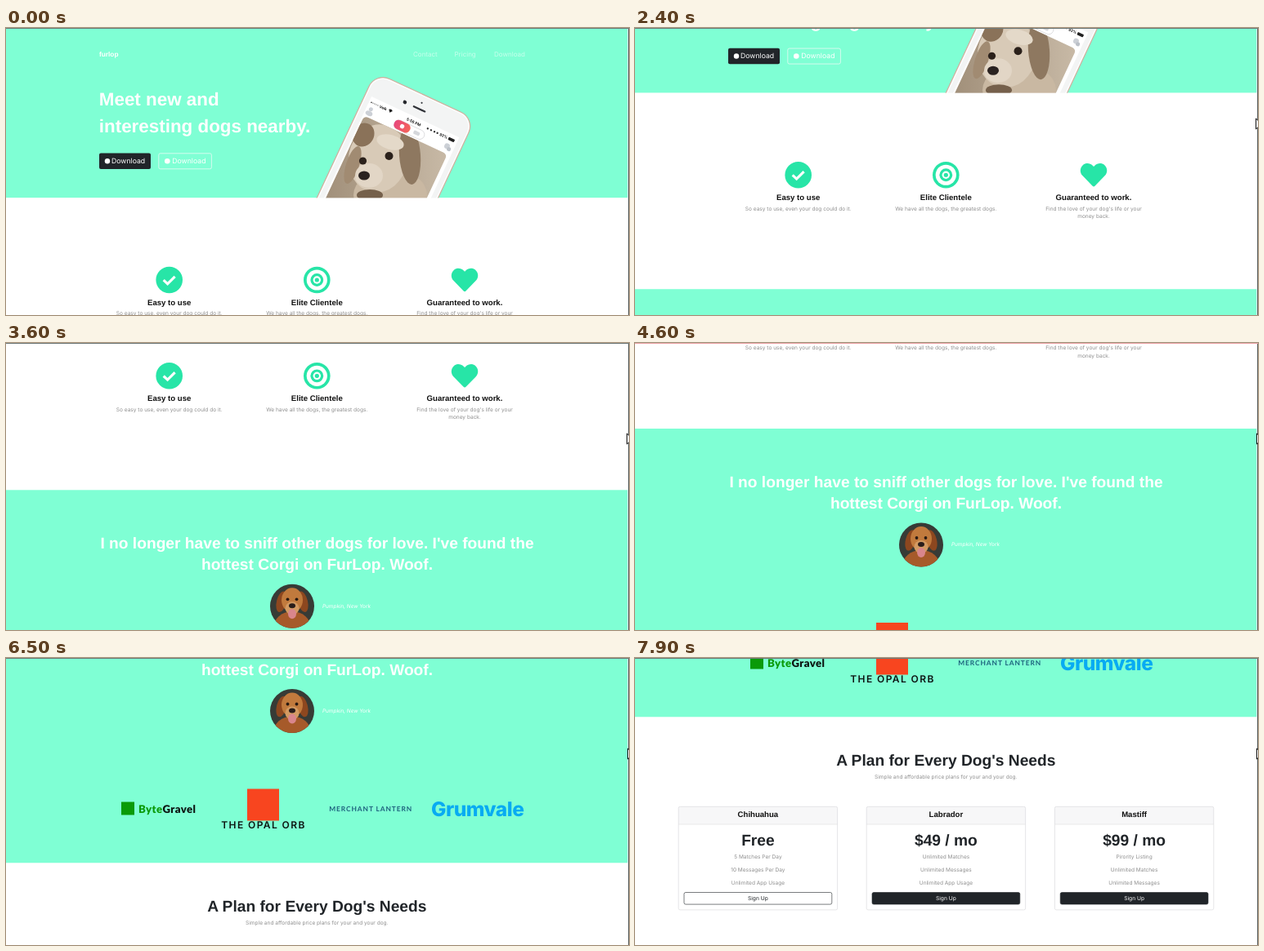
Animation of 762 by 352 pixels, one loop 8 s. Source, as an HTML page:

```html
<!DOCTYPE html>
<html lang="en">
<head>
<meta charset="utf-8">
<title>Dog dating landing page</title>
<style>
  html, body { margin: 0; width: 100%; height: 100%; overflow: hidden; background: #fff; }
  svg { display: block; width: 762px; height: 352px; }
  text { font-family: Inter, sans-serif; text-rendering: geometricPrecision; }
  .bold { font-family: "Liberation Sans", Arial, sans-serif; font-weight: 700; }
  .mid { text-anchor: middle; }
  .h1 { font-size: 22.4px; fill: #fff; }
  .h2 { font-size: 19.2px; }
  .h3 { font-size: 9.6px; fill: #111; }
  .p { font-size: 6.55px; fill: #8f8f8f; }
  .nav { font-size: 8px; fill: #fff; opacity: .55; }
  .btn { font-size: 8.7px; fill: #fff; }
</style>
</head>
<body>
<svg viewBox="0 0 762 352">
  <defs>
    <clipPath id="photo"><rect x="10" y="54" width="112" height="220" rx="5"/></clipPath>
    <clipPath id="round"><circle cx="350" cy="591.5" r="27"/></clipPath>
    <linearGradient id="flame"><stop stop-color="#e8477c"/><stop offset="1" stop-color="#f4655a"/></linearGradient>
    <linearGradient id="wall"><stop stop-color="#9c8a74"/><stop offset="1" stop-color="#cdbfac"/></linearGradient>
  </defs>
  <g id="page"></g>
  <rect x="760" width="1" height="352" fill="#fff" opacity=".7"/>
  <rect x="761" width="1" height="352" fill="#5b6262"/>
  <rect id="topLine" width="762" height="1"/>
  <path id="cursor" d="M.5 .5V13.5L3.6 10.6L5.6 15.3L7.8 14.3L5.8 9.8H10Z" fill="#fff" stroke="#111"/>
</svg>
<script>
const MINT = '#7fffd4', GREEN = '#27e5a7', DARK = '#212529';
const byId = id => document.getElementById(id);

const text = (x, y, cls, str, attrs = '') => `<text x="${x}" y="${y}" class="${cls}" ${attrs}>${str}</text>`;
const rect = (x, y, w, h, fill, attrs = '') =>
  `<rect x="${x}" y="${y}" width="${w}" height="${h}" fill="${fill}" ${attrs}/>`;
const dot = (x, y, r, fill) => `<circle cx="${x}" cy="${y}" r="${r}" fill="${fill}"/>`;
const oval = (x, y, rx, ry, fill, turn = 0) =>
  `<ellipse rx="${rx}" ry="${ry}" fill="${fill}" transform="translate(${x} ${y}) rotate(${turn})"/>`;

function phone() {
  const dog =
    rect(370, 90, 190, 140, 'url(#wall)') +
    oval(470, 205, 45, 32, '#c9b8a2') +
    oval(455, 160, 36, 42, '#d8cab7', 10) +
    oval(437, 131, 13, 15, '#8a7259', 30) +
    oval(494, 156, 13, 36, '#8e7860', -4) +
    oval(470, 140, 17, 9, '#e4d9c9', 15) +
    oval(424, 168, 8, 24, '#a18b72', 18) +
    oval(444, 181, 17, 15, '#e2d6c6') +
    dot(436.5, 163, 4.6, '#2b211b') + dot(468.5, 157, 5, '#2b211b') +
    oval(438, 181, 7, 5.5, '#2a2220') +
    oval(445, 205, 16, 7, '#75604b');
  const small = 'font-size="4.6" font-weight="600"';
  return `<g transform="translate(452 54.4) rotate(25)">
    ${rect(0, 0, 134.5, 320, '#f3f4f4', 'rx="19" stroke="#cfae9c" stroke-width="1.2"')}
    ${rect(1.6, 1.6, 131.3, 320, 'none', 'rx="17.5" stroke="#fff"')}
    ${dot(48, 18, 2.3, '#25272c')}${dot(67, 10, 1.1, '#3a3c42')}
    ${rect(59, 17, 17, 2.2, '#303238', 'rx="1.1"')}
    ${rect(8, 29, 118.5, 300, '#fff')}
    ${[0, 1, 2, 3, 4].map(i => dot(11 + i * 2.2, 35.5, .8, i < 1 ? '#222' : '#999')).join('')}
    ${text(22, 37.2, '', 'Velk', small)}
    <path d="M34 34.3Q36.5 32 39 34.3L36.5 37.3Z" fill="#222"/>
    ${text(68, 37.2, 'mid', '5:56 PM', small)}
    ${[87, 91.5, 96, 100].map(x => dot(x, 35.5, 1.2, '#333')).join('')}
    ${text(103, 37.2, '', '93%', small)}
    ${rect(115, 33.8, 8, 3.6, '#222', 'rx=".8"')}
    ${dot(14, 43.5, 2.5, '#ccd0d6')}${oval(14, 49, 4.5, 3, '#ccd0d6')}
    ${rect(47, 40.5, 40, 11.6, '#fff', 'rx="5.8" stroke="#d9d9dc" stroke-width=".8"')}
    ${rect(47, 40.5, 21, 11.6, 'url(#flame)', 'rx="5.5"')}
    ${dot(57.5, 46.3, 2.7, '#fff')}
    ${rect(73, 44, 8, 4.6, '#d5d7db', 'rx="1.5"')}
    ${dot(117.5, 45, 3.4, '#ccd0d6')}${dot(121, 47.5, 2.5, '#bcc1c8')}
    <g clip-path="url(#photo)"><g transform="rotate(-25) translate(-452 -54.4)">${dog}</g></g>
  </g>`;
}

function hero() {
  return rect(0, 0, 762, 208.4, MINT) +
    text(114, 35, 'bold', 'furlop', 'font-size="8.3" fill="#fff"') +
    text(498, 34.8, 'nav', 'Contact') + text(548.5, 34.8, 'nav', 'Pricing') + text(597, 34.8, 'nav', 'Download') +
    text(113.8, 94.5, 'bold h1', 'Meet new and') +
    text(113.8, 128, 'bold h1', 'interesting dogs nearby.') +
    rect(114, 153.5, 63, 19.5, DARK, 'rx="2"') + dot(124, 163.2, 3.2, '#fff') +
    text(129, 166.2, 'btn', 'Download') +
    rect(186.8, 153.8, 64.6, 19, 'none', 'rx="2" stroke="#f8f9fa" stroke-width=".7"') +
    dot(197.3, 163.2, 3.3, '#fff') + text(203.3, 166.2, 'btn', 'Download') +
    phone();
}

function features() {
  const col = (x, title, ...lines) => text(x, 340, 'bold h3 mid', title) +
    lines.map((s, i) => text(x, 352.4 + i * 9.6, 'p mid', s)).join('');
  const rings = [[16.3, GREEN], [12.6, '#fff'], [7.9, GREEN], [4.7, '#fff'], [2.6, GREEN]];
  return rect(0, 208.4, 762, 240.6, '#fff') +
    dot(199.7, 309, 16.3, GREEN) +
    '<path d="M192.7 309.2L197.6 313.8L206.6 304.8" fill="none" stroke="#fff" stroke-width="3.2"/>' +
    rings.map(([r, c]) => dot(380.3, 309, r, c)).join('') +
    `<path fill="${GREEN}" transform="translate(544.8 292.7) scale(.0635)" d="M462 63C407 16 326 24 276 76L256 96L236 76
      C186 24 105 16 50 63C-13 116 -16 212 40 270L233 470C246 483 266 483 279 470L472 270C528 212 525 116 462 63Z"/>` +
    col(199.7, 'Easy to use', 'So easy to use, even your dog could do it.') +
    col(380.3, 'Elite Clientele', 'We have all the dogs, the greatest dogs.') +
    col(561, 'Guaranteed to work.', "Find the love of your dog's life or your", 'money back.');
}

function avatar() {
  return `<g clip-path="url(#round)">` +
    rect(323, 564, 54, 56, '#373b36') +
    oval(350, 618, 23, 20, '#a65a2a') +
    oval(337, 586, 6, 13, '#8d471f', 14) + oval(363, 586, 6, 13, '#8d471f', -14) +
    oval(350, 584, 13, 15, '#c17a3d') +
    oval(350, 594, 8.5, 8, '#d39a62') +
    oval(350, 601, 5, 6, '#d9868c') +
    dot(344.5, 583, 1.9, '#2a1a12') + dot(355.5, 583, 1.9, '#2a1a12') +
    oval(350, 591, 4, 3, '#2a1d1a') + '</g>';
}

function praise() {
  return rect(0, 449, 762, 329, MINT) +
    text(380.5, 521.2, 'bold h2 mid', "I no longer have to sniff other dogs for love. I've found the", 'fill="#fff"') +
    text(380.5, 547, 'bold h2 mid', 'hottest Corgi on FurLop. Woof.', 'fill="#fff"') +
    avatar() +
    text(387, 593.3, '', 'Pumpkin, New York', 'font-size="6.4" font-style="italic" fill="#fff"') +
    rect(141, 703, 16, 16, '#0a9a08') +
    text(162, 716, '', '<tspan fill="#0a9a08">Byte</tspan>Gravel',
      'style="font:900 13.2px Lato,sans-serif" fill="#0d1512" letter-spacing=".4"') +
    rect(295, 687, 39, 39, '#f8451f') +
    text(315, 735.6, 'mid', 'THE OPAL ORB', 'font-size="12" font-weight="600" letter-spacing="1.4" fill="#0d1512"') +
    text(395.3, 714.3, '', 'MERCHANT LANTERN',
      'style="font:700 8.4px Lato,sans-serif" letter-spacing=".9" fill="#1d617d"') +
    text(520, 720, '', 'Grumvale', 'font-size="24.5" font-weight="800" letter-spacing="-.5" fill="#08abf2"');
}

function pricing() {
  const card = (left, name, price, lines, filled) => {
    const x = left + 97.2;
    return rect(left, 887.8, 194.4, 126.6, '#fff', 'rx="2"') +
      rect(left, 887.8, 194.4, 21.8, '#f7f7f8') +
      rect(left, 909.2, 194.4, .6, '#dcdcde') +
      rect(left, 887.8, 194.4, 126.6, 'none', 'rx="2" stroke="#dcdcde" stroke-width=".7"') +
      text(x, 900.3, 'bold h3 mid', name) +
      text(x, 935, 'bold h2 mid', price, `fill="${DARK}"`) +
      lines.map((s, i) => text(x, 951.7 + i * 16, 'p mid', s)).join('') +
      rect(left + 6.8, 993, 180.8, 14.6, filled ? DARK : '#fff', `rx="2" stroke="${DARK}" stroke-width=".6"`) +
      text(x, 1002.4, 'mid', 'Sign Up', `font-size="6.7" fill="${filled ? '#fff' : DARK}"`);
  };
  const any = s => 'Unlimited ' + s;
  return rect(0, 778, 762, 300, '#fff') +
    text(380.3, 837.3, 'bold h2 mid', "A Plan for Every Dog's Needs", `fill="${DARK}"`) +
    text(380.3, 853.8, 'p mid', 'Simple and affordable price plans for your and your dog.') +
    card(53.2, 'Chihuahua', 'Free', ['5 Matches Per Day', '10 Messages Per Day', any('App Usage')]) +
    card(283.2, 'Labrador', '$49 / mo', [any('Matches'), any('Messages'), any('App Usage')], true) +
    card(513.4, 'Mastiff', '$99 / mo', ['Pirority Listing', any('Matches'), any('Messages')], true);
}

byId('page').innerHTML = hero() + features() + praise() + pricing();

// [ms, scroll offset]
const stops = [[0, 0], [1400, 0], [1800, 43.5], [2900, 200], [3300, 246], [3900, 280], [4000, 280],
  [4600, 344], [5300, 439], [6100, 521], [6400, 521], [6500, 526.5], [7900, 705.5]];
const secants = stops.slice(1).map(([t, y], i) => (y - stops[i][1]) / (t - stops[i][0]));
const slopes = stops.map((_, i) => {
  const a = secants[i - 1] ?? secants[i], b = secants[i] ?? a;
  return a * b > 0 ? 2 * a * b / (a + b) : 0;
});

// Monotone cubic through the stops
function scrollAt(t) {
  const i = Math.min(stops.filter(s => s[0] <= t).length - 1, stops.length - 2);
  const [t0, y0] = stops[i], [t1, y1] = stops[i + 1];
  const h = t1 - t0, u = (t - t0) / h, v = 1 - u;
  return y0 * (1 + 2 * u) * v * v + y1 * u * u * (3 - 2 * u) +
    h * u * v * (slopes[i] * v - slopes[i + 1] * u);
}

// [from ms, x, y]
const pointer = [[0, 780, 120], [500, 754, 120], [700, 756, 116], [800, 758, 112], [900, 759, 110.5], [4100, 760, 110.5]];

const start = performance.now();
function draw() {
  const t = Math.floor((performance.now() - start) % 8000 / 100) * 100;
  byId('page').setAttribute('transform', `translate(0 ${-scrollAt(t)})`);
  const [, x, y] = pointer.filter(p => p[0] <= t).pop();
  byId('cursor').setAttribute('transform', `translate(${x} ${y})`);
  byId('topLine').setAttribute('fill', t >= 4100 && t < 5900 ? '#eda3a6' : '#6d7878');
  requestAnimationFrame(draw);
}
draw();
</script>
</body>
</html>
```
